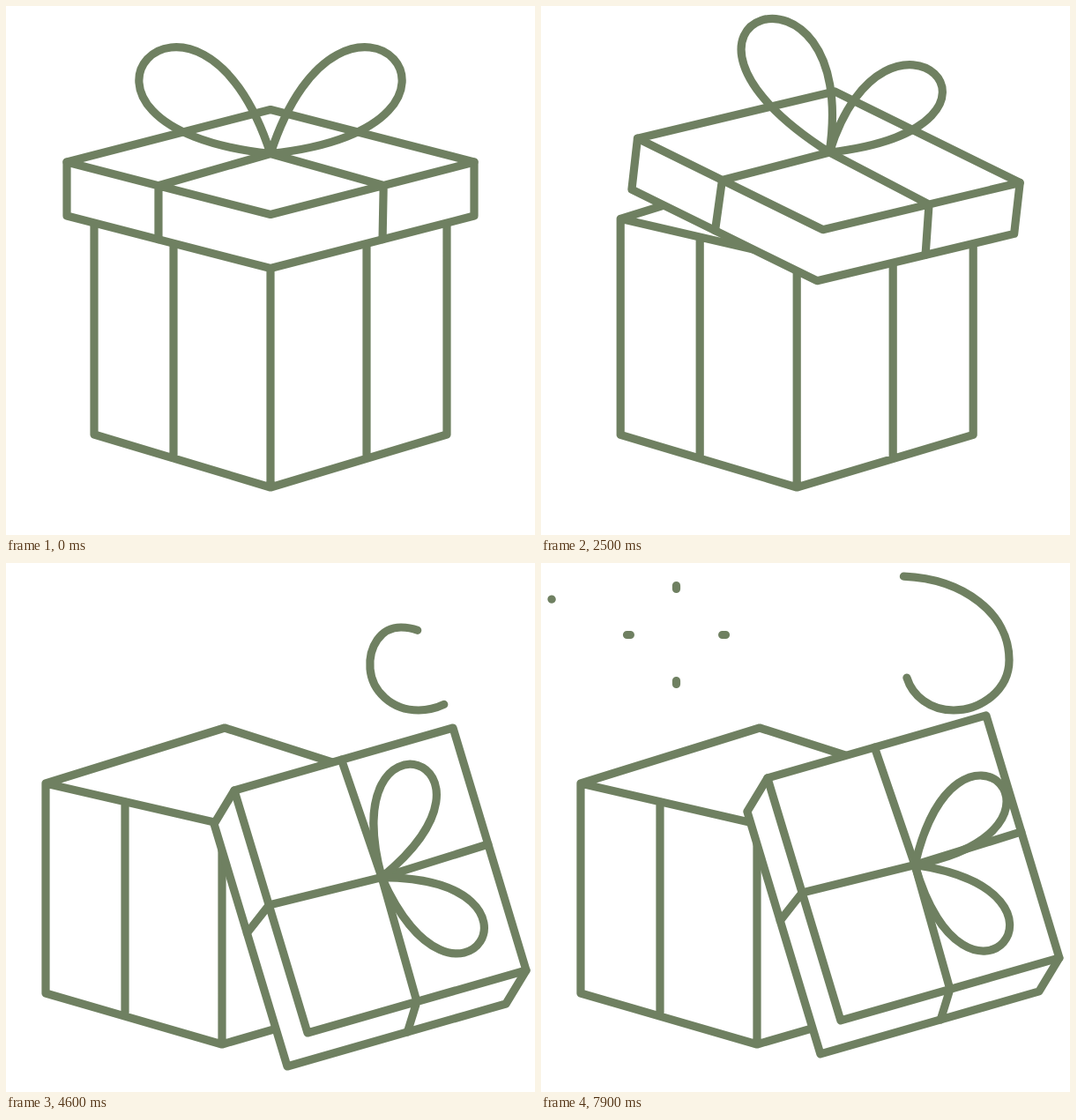
Recreate the animation shown at these times as an HTML page. Size 600x600 px, loop 8 s.

```html
<!DOCTYPE html>
<html lang="en">
<head>
<meta charset="utf-8">
<title>Gift box</title>
<style>
  html, body { margin: 0; width: 100%; height: 100%; overflow: hidden; background: #fff; }
  svg { display: block; width: 100vw; height: 100vh; }
  path, circle { fill: none; stroke: #6f8061; stroke-width: 9.2; stroke-linecap: round; stroke-linejoin: round; }
  #shell { fill: #fff; }
  #ring { stroke-width: 6; }
</style>
</head>
<body>
<svg viewBox="0 0 600 600">
  <path id="body"/>
  <path id="swirl" d="M222 280C214 250 217 215 222 165C240 60 320 15 403 15C475 15 531 55 531 110C531 145 498 167 468 167C437 167 415 145 413 120C411 95 425 73 448 73C470 73 489 85 485 107Q483 116 478 124"/>
  <path id="streak" d="M180 262Q130 152 54 80Q38 64 12 41"/>
  <path id="burst"/>
  <circle id="ring" cx="153" cy="81.5" r="6"/>
  <path id="shell"/>
  <path id="ribbon"/>
  <path id="bow"/>
</svg>
<script>
const LOOP = 8000, TURN = 6050, STEP = 100;
const el = id => document.getElementById(id);
const setPath = (id, d) => el(id).setAttribute("d", d);
const show = (id, on) => el(id).style.display = on ? "" : "none";

const easeIn = p => k => k ** p;
const easeOut = p => k => 1 - (1 - k) ** p;
const smooth = k => k * k * (3 - 2 * k);
const ramp = (from, to, t) => Math.max(0, Math.min(1, (t - from) / (to - from)));
const pulse = (from, to, t) => Math.sin(Math.PI * ramp(from, to, t));

const mix = (a, b, k) => a.map((v, i) => v + (b[i] - v) * k);
const fmt = (...pts) => pts.map(p => p.map(v => v.toFixed(2)).join(" ")).join(" ");
const line = (...pts) => "M" + pts.map(p => fmt(p)).join("L");

// Stops are [time, values, easing of the way there]
function tween(stops, t) {
  const i = stops.findIndex(s => s[0] > t);
  if (i < 0) return stops.at(-1)[1];
  const [from, a] = stops[i - 1], [to, b, ease] = stops[i];
  return mix(a, b, ease(ramp(from, to, t)));
}

// Lid: left corner, back edge, front edge, height (as vectors), openness
const level = (y, rise, height) => [69, y, 231, -rise, 231, rise, 0, height, 0];
const LOW = level(193, 57, 59);
const LID = [
  [0, level(177, 59.5, 61)],
  [1100, LOW, easeIn(4)],
  [1500, LOW, smooth],
  [1900, level(171, 61, 63), smooth],
  [3000, [205, 101, 206, -35, 161, 204, -22, 46, 1], easeIn(2)],
  [3690, [259, 258, 248, -71, 83, 275, -23, 38, 1], easeIn(1.3)]
];

// Bow: axis angle, inner and outer reach of each loop
const mirrored = (axis, inner, outer) => [axis, inner, outer, -axis, inner, outer];
const SAG = mirrored(-53, 239, 301);
const BOW = [
  [0, mirrored(-51, 269, 291)],
  [1100, SAG, easeIn(4)],
  [1500, SAG, smooth],
  [1900, mirrored(-69, 222, 321), smooth],
  [3000, [-18, 252, 282, 47.5, 217, 245], easeOut(2.6)],
  [3900, [10, 212, 212, 121, 212, 212], smooth]
];

function drawBody(t) {
  const squash = easeIn(4)(ramp(0, 1100, t)) * (1 - smooth(ramp(1500, 1900, t)));
  const settle = pulse(1500, 2300, t);
  const slide = smooth(ramp(2150, 3450, t));
  const cx = 300 - 55 * slide;
  const rim = 236 + 14 * squash + 14 * slide + 11 * pulse(2400, 3600, t);
  const top = dx => [cx + dx, rim + 46 - Math.abs(dx) * .23];
  const foot = dx => [cx + dx, 546 - Math.abs(dx) * .3 + 2 * slide * Math.abs(dx) / 200];

  let d = line(top(-200), top(0), top(200), [cx + 3, rim - 63]) + "Z";
  for (const dx of [-200, -110, 0, 109, 200]) {
    const swell = (dx < 0 ? -1 : 1) * (13 + Math.abs(dx) * .055) * squash * 4 / 3;
    const sway = 21 * settle * (dx / 200) ** 3;
    const [x, y0] = top(dx), [, y1] = foot(dx), h = y1 - y0;
    d += "M" + fmt([x, y0]) + "C" + fmt([x + swell, y0 + h * .33], [x + swell + sway, y0 + h * .72], [x, y1]);
  }
  setPath("body", d + line(foot(-200), foot(0), foot(200)));
}

// Shows the part of a path between two fractions of its length
function trim(id, tail, head) {
  const size = el(id).getTotalLength();
  show(id, head > tail && tail < 1);
  el(id).style.strokeDasharray = `${(head - tail) * size} ${size * 2}`;
  el(id).style.strokeDashoffset = -tail * size;
}

function drawSparks(t) {
  const glide = easeOut(2.6);
  trim("swirl", glide(ramp(3750, 6000, t)), glide(ramp(2985, 5485, t)));
  trim("streak", glide(ramp(2950, 4300, t)), glide(ramp(2700, 3300, t)));

  const r0 = 56 * easeOut(1.9)(ramp(2970, 4600, t)), r1 = 56 * glide(ramp(2960, 3900, t));
  const rays = [0, 1, 2, 3].map(i => {
    const x = Math.cos(i * Math.PI / 2), y = Math.sin(i * Math.PI / 2);
    return line(...[r0, r1].map(r => [153.5 + x * r, 81.5 + y * r]));
  });
  setPath("burst", rays.join(""));
  show("burst", t > 3000 && t <= 4500);
  show("ring", t > 2900 && t <= 3000);
}

function drawLid(t) {
  const [x, y, ax, ay, bx, by, dx, dy, open] = tween(LID, t);
  const hop = Math.max(0, 20.5 * (1 - ((t - 4015) / 330) ** 2));
  // Point on the lid: along the back edge, along the front edge, downwards
  const on = (a, b, down = 0) => [
    x - hop * .15 + ax * a + bx * b + dx * down,
    y - hop + ay * a + by * b + dy * down
  ];
  setPath("shell", line(on(0, 0), on(1, 0), on(1, 1), on(1, 1, 1), on(0, 1, 1), on(0, 0, 1)) + "Z");

  const q = .42 + .07 * open, knot = on(1 - q, q);
  let d = line(on(0, 0), on(0, 1), on(1, 1));
  d += line(on(0, .45, 1), on(0, .45 + .023 * open), knot, on(.555 - .055 * open, 1), on(.55, 1, 1));
  if (t >= 3300) d += line(on(.49, 0), knot, on(1, .48));
  setPath("ribbon", d);
  drawBow(t, knot);
}

function drawBow(t, knot) {
  const [left, in1, out1, right, in2, out2] = tween(BOW, t);
  const swing = 36 * Math.exp((4200 - t) / 1150) * Math.cos((t - 4200) / 1000 * Math.PI)
    * smooth(ramp(3000, 3900, t));
  const reach = (deg, r) => {
    const a = deg * Math.PI / 180;
    return [knot[0] + r * Math.sin(a), knot[1] - r * Math.cos(a)];
  };
  const loop = (axis, side, inner, outer) =>
    "M" + fmt(knot) + "C" + fmt(reach(axis - side * 33, inner), reach(axis + side * 33, outer), knot);
  setPath("bow", loop(left + swing, -1, in1, out1) + loop(right + swing * .28, 1, in2, out2));
}

function draw(now) {
  const clock = Math.floor(now % LOOP / STEP) * STEP;
  // The scene plays backwards after the turn
  const t = clock > TURN ? 2 * TURN - clock : clock;
  drawBody(t);
  drawSparks(t);
  drawLid(t);
}

let start;
function tick(now) {
  start ??= now;
  draw(now - start);
  requestAnimationFrame(tick);
}
draw(0);
requestAnimationFrame(tick);
</script>
</body>
</html>
```
